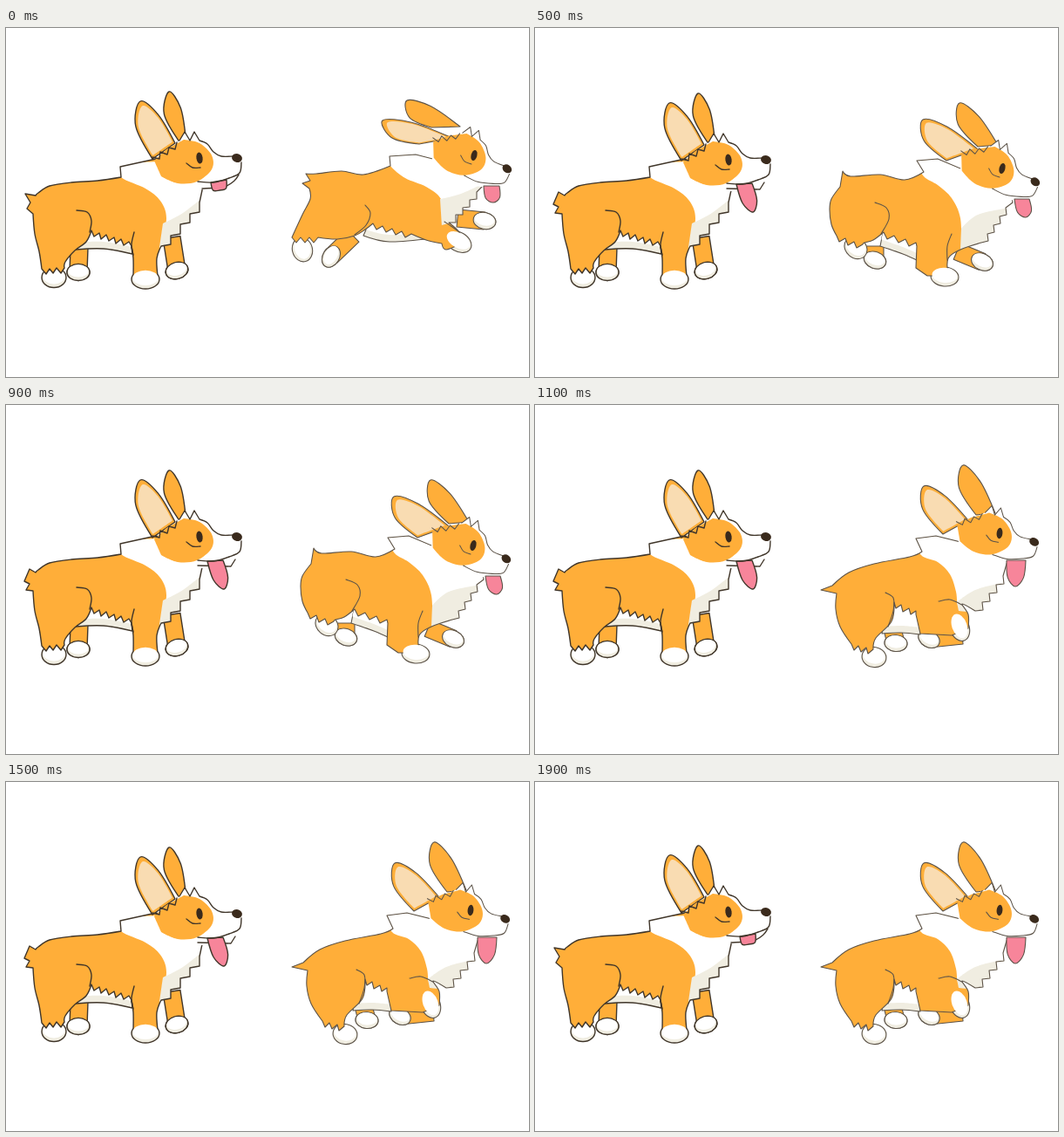
Recreate the animation shown at these times as an HTML page. Size 600 by 400 pixels, loop 2000 ms.

```html
<!DOCTYPE html>
<html lang="en">
<head>
<meta charset="utf-8">
<title>Two corgis</title>
<style>
html, body { margin: 0; width: 100%; height: 100%; overflow: hidden; background: #fff; }
svg { display: block; width: 600px; height: 400px; }
path, ellipse { stroke-linejoin: round; stroke-linecap: round; }
</style>
</head>
<body>
<svg id="stage" viewBox="0 0 600 400"></svg>
<script>
// Outlines are key points "x,y"; a "!" marks a corner, the others are joined smoothly.
const ORANGE = '#ffae39', WHITE = '#fff', SHADE = '#f0ede1', CREAM = '#f9dcb2',
      PINK = '#f7859a', DARK = '#3a2a1c';

// Zigzag of hair from one point to another, its tips on the left of the way.
function fur(x1, y1, x2, y2, teeth, depth) {
  const dx = x2 - x1, dy = y2 - y1, k = depth / Math.hypot(dx, dy);
  return Array.from({ length: 2 * teeth + 1 }, (_, i) => {
    const t = i / (2 * teeth), out = i % 2 ? k : 0;
    return `${Math.round(x1 + dx * t + dy * out)},${Math.round(y1 + dy * t - dx * out)}!`;
  }).join(' ');
}

// One head for every pose, turned around its eye.
const EYE = [222, 149];
const brow = fur(199, 129, 222, 129, 2, 10) + ' 231,133 238,142 247,147 261,147';
const face = brow + ' 270,152 269,164 260,175 244,181 225,185 205,190 180,178 172,152!';
const patch = '170,152! 184,139! 204,128! 222,132 236,146 236,162 219,176 197,178 178,170!';
const tuft = fur(168, 148, 196, 131, 3, -6);

const standBody = tail =>
  `37,189 50,181 75,177 105,175 132,171! 131,159! 172,150! 226,165! 225,186!
  ${fur(222, 200, 178, 250, 4, 7)} 173,264 174,284! 146,284! 146,264 144,250!
  ${fur(141, 245, 98, 232, 5, 6)} 92,245 79,255 68,268
  ${fur(67, 275, 41, 276, 3, 6)} 38,256 33,236 31,213! ${tail} 34,192!`;

const calm = {
  eye: '222,149', turn: '0', scale: 1, line: '#40362a', width: 1.4,
  body: standBody('24,207! 28,200! 22,190!'),
  bib: '128,155! 132,171 160,184 177,198 184,218 178,252! 240,252! 240,150!',
  chest: '180,224! 203,212 226,194! 232,252! 176,252!',
  belly: '80,254! 98,230! 143,242! 145,259! 112,253',
  foreFoot: '160,288,0', hindFoot: '55,286,0',
  farFore: '190,240 196,278,165', farHind: '84,252 83,280,0',
  thigh: '81,209 93,211 98,221 96,234', shoulder: '147,234 144,248 146,260',
  nearEar: '168,150 154,84 194,132', farEar: '200,132 187,73 206,124',
  tongue: '253,174 245,186 235,177', chin: '267,168 262,175 250,182 225,184'
};

const pant = {
  ...calm, eye: '222,151', body: standBody('23,212! 27,205! 21,202! 27,188!'),
  nearEar: '168,152 154,86 194,134', farEar: '200,134 187,75 206,126',
  tongue: '249,178 250,211 231,179', chin: '263,177! 258,185! 220,184'
};

const runner = { scale: 0.95, line: '#5c5348', width: 1.1, chin: '' };

const leap = {
  ...runner, eye: '537,146', turn: '22',
  body: `356,167 385,164 410,168 441,158! 440,147! 470,145! 552,166! 546,182!
    ${fur(540, 188, 508, 223, 4, 6)} 520,234 524,246! 505,254 500,247! 482,243
    ${fur(465, 236, 421, 224, 4, 6)} 412,231 400,238 380,242
    ${fur(358, 240, 328, 240, 3, 6)} 340,214 349,196 348,184! 340,178! 349,175! 344,167!`,
  bib: '436,145! 441,158 458,172 482,182 499,196 505,222! 530,224! 560,215! 560,145!',
  chest: '498,196! 522,190 550,177! 540,215! 500,226!',
  belly: '410,238! 418,220! 465,230! 488,241! 440,245',
  foreFoot: '519,245,30', hindFoot: '340,254,75',
  farFore: '518,218 549,221,12', farHind: '398,238 373,262,120',
  thigh: '412,203 418,212 413,226 400,237', shoulder: '503,222 512,228 520,234',
  nearEar: '474,133 432,106 512,126', farEar: '488,114 460,83 521,113',
  tongue: '566,181 559,200 548,181'
};

const land = {
  ...runner, eye: '536,161', turn: '22',
  body: `362,170 396,168 424,174 446,165! 438,152! 462,150! 545,185! 548,200!
    ${fur(540, 206, 512, 246, 4, 6)} 488,254 474,264 474,284! 450,284! 437,275! 438,250!
    ${fur(437, 246, 400, 234, 3, 6)} 388,243 378,246
    ${fur(376, 248, 346, 238, 3, 6)} 340,225 338,208 340,196 350,182! 353,164!`,
  bib: '436,150! 446,170 462,180 478,195 488,218 489,254! 520,252! 560,215! 560,150!',
  chest: '489,230! 508,214 545,206! 535,248! 488,256!',
  belly: '396,250! 400,230! 440,232! 440,267! 422,259',
  foreFoot: '470,285,5', hindFoot: '368,252,40',
  farFore: '484,256 513,268,25', farHind: '390,250 390,266,20',
  thigh: '390,200 403,206 406,219 397,236', shoulder: '478,236 473,250 473,266',
  nearEar: '472,152 445,105 508,139', farEar: '508,136 487,86 531,134',
  tongue: '567,196 563,217 550,196'
};

const push = {
  ...runner, eye: '533,147', turn: '14',
  body: `360,192 389,182 430,174 444,168! 437,153! 460,150! 541,170! 541,182!
    ${fur(537, 196, 505, 236, 4, 6)} 490,228 497,240 497,256! 478,264! 442,262! 437,240!
    ${fur(437, 236, 412, 226, 3, 6)} 409,248 391,267
    ${fur(388, 280, 363, 274, 3, 6)} 350,254 345,234 346,216! 328,212! 341,207!`,
  bib: '434,150! 443,172 462,180 476,194 483,214 484,228! 512,236! 560,215! 560,150!',
  chest: '484,226! 505,212 535,204! 530,240! 486,236!',
  belly: '398,262! 405,215! 440,215! 442,263! 420,261',
  foreFoot: '487,255,70', hindFoot: '389,289,10',
  farFore: '490,264 452,268,30', farHind: '410,256 414,273,5',
  thigh: '402,215 411,221 411,236 405,254', shoulder: '463,225 476,223 490,229',
  nearEar: '468,148 446,93 497,132', farEar: '506,126 491,69 528,124',
  tongue: '563,178 551,208 541,178'
};

// Pose halfway between two poses with matching key points.
function between(a, b) {
  const pose = { ...a };
  for (const key in a) {
    if (key in runner) continue;
    const other = b[key].match(/\d+/g);
    let i = 0;
    pose[key] = a[key].replace(/\d+/g, n => (+n + +other[i++]) / 2);
  }
  return pose;
}

const numbers = text => text.match(/[\d.]+/g).map(Number);

function outline(points, closed = true) {
  const p = points.trim().split(/\s+/).map(s => {
    const [x, y] = s.split(',').map(parseFloat);
    return { x, y, corner: s.endsWith('!') };
  });
  const n = p.length;
  const at = i => closed ? p[(i + n) % n] : p[Math.max(0, Math.min(n - 1, i))];
  const handle = (i, sign) => {
    const c = at(i), k = c.corner ? 0 : sign / 6;
    return `${c.x + (at(i + 1).x - at(i - 1).x) * k} ${c.y + (at(i + 1).y - at(i - 1).y) * k}`;
  };
  let d = `M${p[0].x} ${p[0].y}`;
  for (let i = 0; i < (closed ? n : n - 1); i++)
    d += `C${handle(i, 1)} ${handle(i + 1, -1)} ${at(i + 1).x} ${at(i + 1).y}`;
  return d + (closed ? 'Z' : '');
}

const fill = (points, color) => `<path d="${outline(points)}" fill="${color}" stroke="none"/>`;
const inked = (points, color) => `<path d="${outline(points)}" fill="${color}"/>`;
const line = points => `<path d="${outline(points, false)}"/>`;
const oval = (x, y, rx, ry, angle, style) =>
  `<ellipse rx="${rx}" ry="${ry}" transform="translate(${x} ${y}) rotate(${angle})" ${style}/>`;

let clips = 0;
function inside(points, content) {
  const id = 'clip' + clips++;
  return `<clipPath id="${id}"><path d="${outline(points)}"/></clipPath>` +
    `<g clip-path="url(#${id})">${content}</g>`;
}

// Leaf shape for ears and tongues: root, tip, root; "inset" shrinks it.
function leaf(key, left, right, inset = 0) {
  const [ax, ay, tx, ty, bx, by] = numbers(key);
  const cx = (ax + bx + tx) / 3, cy = (ay + by + ty) / 3;
  const pull = (x, y) => [x + (cx - x) * inset, y + (cy - y) * inset];
  const [tipX, tipY] = pull(tx, ty);
  const side = (x, y, bulge) => {
    const dx = tipX - x, dy = tipY - y, k = bulge * (1 - inset) / Math.hypot(dx, dy);
    return `${x + dx * 0.6 + dy * k},${y + dy * 0.6 - dx * k}`;
  };
  const a = pull(ax, ay), b = pull(bx, by);
  return `${a}! ${side(...a, left)} ${tipX},${tipY} ${side(...b, -right)} ${b}!`;
}

const ear = key => leaf(key, 11, 6);

const footEdge = (x, y, angle, rx, ry) => oval(x, y, rx, ry, angle, `fill="${SHADE}"`);
const footTop = (x, y, angle, rx, ry) =>
  oval(x, y - 1.6, rx - 1.5, ry - 2.4, angle, `fill="${WHITE}" stroke="none"`);

function farLeg(key) {
  const [hx, hy, x, y, angle] = numbers(key);
  const k = 10 / Math.hypot(x - hx, y - hy), nx = (y - hy) * k, ny = (hx - x) * k;
  const foot = [x, y, angle, 13, 9.5];
  return footEdge(...foot) +
    inked(`${hx + nx},${hy + ny}! ${x + nx},${y + ny}! ${x - nx},${y - ny}! ${hx - nx},${hy - ny}!`, ORANGE) +
    footEdge(...foot) + footTop(...foot);
}

function dog(pose) {
  const foreFoot = [...numbers(pose.foreFoot), 16, 11];
  const hindFoot = [...numbers(pose.hindFoot), 14, 11.5];
  const onHead = content => `<g transform="translate(${pose.eye}) rotate(${pose.turn}) ` +
    `scale(${pose.scale}) translate(${-EYE[0]} ${-EYE[1]})">${content}</g>`;
  const dark = `fill="${DARK}" stroke="none"`;

  return `<g fill="none" stroke="${pose.line}" stroke-width="${pose.width}">` +
    farLeg(pose.farHind) + farLeg(pose.farFore) +
    inked(pose.belly, SHADE) +
    inside(pose.belly, `<g transform="translate(0 -8)">${fill(pose.belly, WHITE)}</g>`) +
    footEdge(...hindFoot) + footTop(...hindFoot) + footEdge(...foreFoot) +
    fill(pose.body, ORANGE) +
    inside(pose.body, fill(pose.bib, WHITE) + fill(pose.chest, SHADE)) +
    inked(pose.body, 'none') + footTop(...foreFoot) +
    line(pose.thigh) + line(pose.shoulder) +
    inked(ear(pose.farEar), ORANGE) +
    onHead(fill(face, WHITE)) +
    inked(ear(pose.nearEar), ORANGE) + fill(leaf(pose.nearEar, 11, 6, 0.14), CREAM) +
    onHead(fill(patch, ORANGE) + line(tuft) + line(brow) + line('207,155 214,160 223,160') +
      oval(...EYE, 3.6, 6.5, -8, dark) + oval(265, 149, 6, 4.8, 15, dark)) +
    (pose.chin && line(pose.chin)) +
    inked(leaf(pose.tongue, 5, 5), PINK) +
    onHead(line('270,154 268,166 256,172 238,177 220,176')) + '</g>';
}

const STEP = 100, STEPS = 20;
const stand = [calm, pant].map(dog);
const run = [leap, land, between(land, push), push].map(dog);
const stage = document.getElementById('stage');
stage.innerHTML = [...stand, ...run].join('');
const drawings = [...stage.children];

function tick() {
  const step = Math.floor(performance.now() / STEP) % STEPS;
  const standing = step === STEPS - 1 ? 0 : step % stand.length;
  const running = stand.length + step % run.length;
  drawings.forEach((g, i) => {
    g.style.display = i === standing || i === running ? '' : 'none';
  });
  requestAnimationFrame(tick);
}
tick();
</script>
</body>
</html>
```
